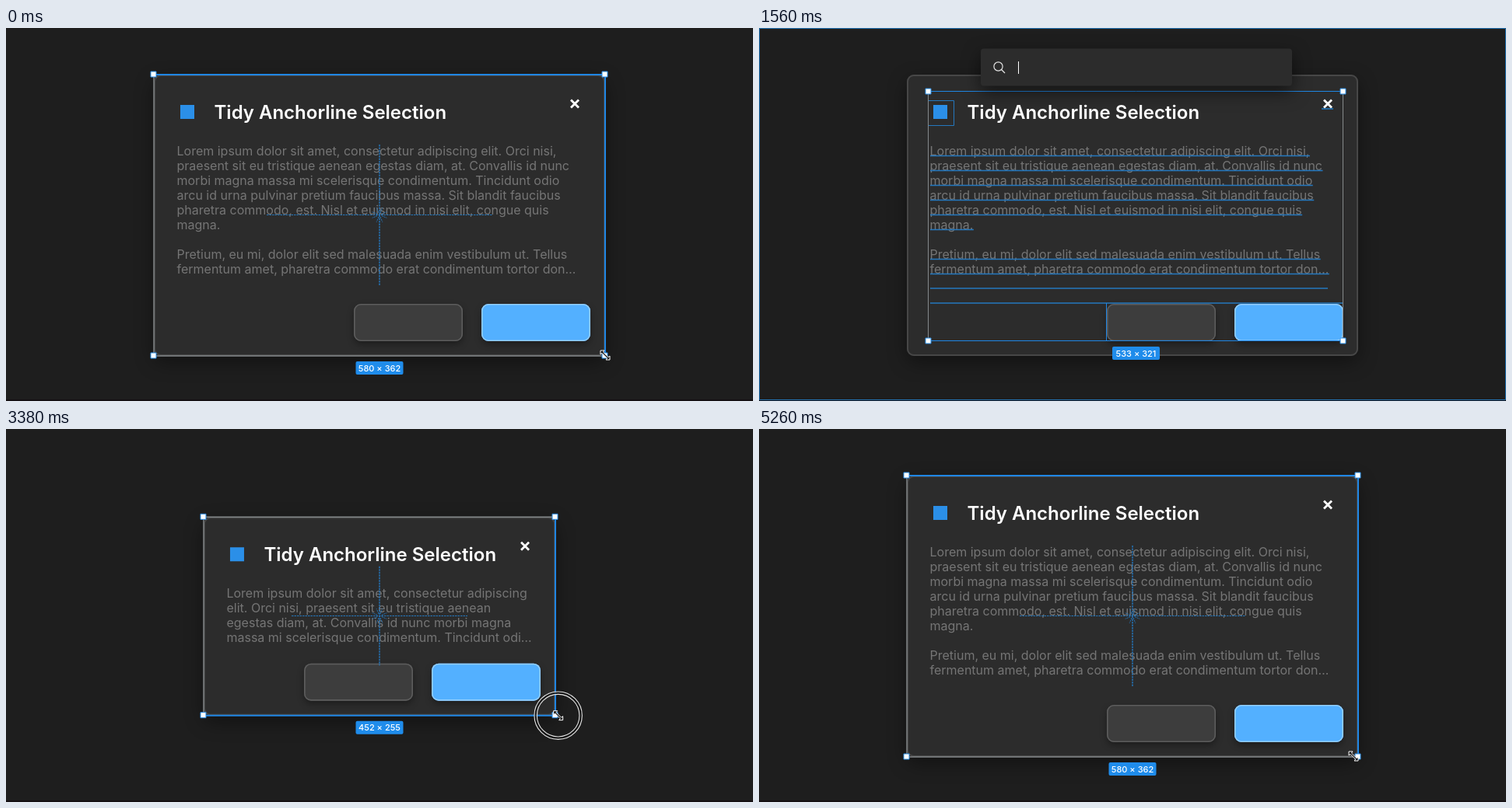
An HTML page with a canvas that plays this animation: 960 by 480 pixels, repeating every 5290 ms.

```html
<!DOCTYPE html>
<html lang="en">
<head>
<meta charset="utf-8">
<title>Resize demo</title>
<style>
html, body { margin: 0; width: 100%; height: 100%; overflow: hidden; background: #1e1e1e; }
canvas { display: block; }
</style>
</head>
<body>
<canvas id="stage" width="960" height="480"></canvas>
<script>
const ctx = document.getElementById('stage').getContext('2d');
const LOOP = 5290;
const CX = 480, CY = 241;
const FULL = { l: 190, t: 60, r: 770, b: 422 };
const BUTTONS = [447, 611], BUTTON_Y = 355, BUTTON_W = 140, BUTTON_H = 48;
const BLUE = '#1f86e4', UNDER = '#2478bf', RED = '#d0482c', EDGE = '#85898b';
const SANS = 'Inter, sans-serif';
const BODY = '400 16px ' + SANS;

const PLUGIN = 'Tidy Anchorlines';
const QUERY = 'tidy anchorlin';
const COMMANDS = ['Frame Selection', 'Ignore Selection', 'Selection',
  'Ungroup Selection', 'Watch Mode (beta)'];
const PARAGRAPHS = [
  'Lorem ipsum dolor sit amet, consectetur adipiscing elit. Orci nisi, praesent sit eu ' +
  'tristique aenean egestas diam, at. Convallis id nunc morbi magna massa mi scelerisque ' +
  'condimentum. Tincidunt odio arcu id urna pulvinar pretium faucibus massa. Sit blandit ' +
  'faucibus pharetra commodo, est. Nisl et euismod in nisi elit, congue quis magna.',
  '',
  'Pretium, eu mi, dolor elit sed malesuada enim vestibulum ut. Tellus fermentum amet, ' +
  'pharetra commodo erat condimentum tortor donec mattis.'
];

// Press and release times; the card follows the pointer a little late.
const DRAGS = [[90, 1040], [3010, 4480]];
const LAG = 60, START = 130;

// [time, x, y] turning points of the pointer
const POINTER = [
  [0, 770, 421], [90, 772, 422], [330, 722, 362], [590, 784, 381.5], [700, 794, 402],
  [940, 768, 427.5], [2880, 735, 446], [3000, 768, 421], [3060, 766, 420],
  [3130, 718, 410], [3330, 706, 368], [3630, 770, 386.5], [3690, 779, 408.5],
  [3770, 782, 417], [4050, 771, 428], [4540, 773, 424], [5260, 764, 421], [LOOP, 770, 421]
];

// monotone cubic through the turning points
function pointerAt(t) {
  const keys = POINTER, n = keys.length - 1;
  let i = 0;
  while (i < n - 1 && keys[i + 1][0] < t) i++;
  const span = keys[i + 1][0] - keys[i][0], u = (t - keys[i][0]) / span, v = 1 - u;
  const slope = (j, k) => (keys[j + 1][k] - keys[j][k]) / (keys[j + 1][0] - keys[j][0]);
  const tangent = (j, k) => {
    if (j === 0 || j === n) return 0;
    const a = slope(j - 1, k), b = slope(j, k);
    return a * b <= 0 ? 0 : 2 * a * b / (a + b);
  };
  return [1, 2].map(k =>
    keys[i][k] * v * v * (1 + 2 * u) + keys[i + 1][k] * u * u * (3 - 2 * u) +
    span * (tangent(i, k) * u * v * v - tangent(i + 1, k) * u * u * v));
}

const within = (t, a, b) => t >= a && t < b;
const snap = (v, stops, reach) => stops.find(s => Math.abs(v - s) < reach) ?? v;

// The card resizes about its centre and snaps to its old edges and the button middle.
function cardAt(t, dragging, pinned) {
  if (!dragging) return FULL;
  const [x, y] = pointerAt(t - LAG);
  const stops = pinned ? [FULL.b] : [FULL.b, BUTTON_Y + BUTTON_H / 2];
  const r = snap(x, [FULL.r], 10), b = snap(y + 0.5, stops, 7.5);
  return { l: 2 * CX - r, t: 2 * CY - b, r, b };
}

function line(x1, y1, x2, y2, color, width = 1, dash = []) {
  ctx.strokeStyle = color;
  ctx.lineWidth = width;
  ctx.setLineDash(dash);
  ctx.beginPath();
  ctx.moveTo(x1, y1);
  ctx.lineTo(x2, y2);
  ctx.stroke();
  ctx.setLineDash([]);
}

function box(x, y, w, h, radius, fill, stroke, width = 1) {
  ctx.beginPath();
  ctx.roundRect(x, y, w, h, radius);
  if (fill) { ctx.fillStyle = fill; ctx.fill(); }
  if (stroke) { ctx.strokeStyle = stroke; ctx.lineWidth = width; ctx.stroke(); }
}

function ring(x, y, r, color, width) {
  ctx.strokeStyle = color;
  ctx.lineWidth = width;
  ctx.beginPath();
  ctx.arc(x, y, r, 0, 2 * Math.PI);
  ctx.stroke();
}

function shadowed(blur, dy, alpha, draw) {
  ctx.save();
  ctx.shadowColor = `rgba(0,0,0,${alpha})`;
  ctx.shadowBlur = blur;
  ctx.shadowOffsetY = dy;
  draw();
  ctx.restore();
}

function text(str, x, y, font, color, align = 'left') {
  ctx.font = font;
  ctx.fillStyle = color;
  ctx.textAlign = align;
  ctx.fillText(str, x, y);
}

function wrap(width, maxLines) {
  ctx.font = BODY;
  const fits = s => ctx.measureText(s).width <= width;
  const rows = [];
  for (const p of PARAGRAPHS) {
    let row = '';
    for (const word of p.split(' ')) {
      const next = row ? row + ' ' + word : word;
      if (row && !fits(next)) { rows.push({ s: row, rest: ' ' + word }); row = word; }
      else row = next;
    }
    rows.push({ s: row, rest: '' });
  }
  const shown = rows.slice(0, Math.max(0, maxLines)).map(r => r.s);
  if (shown.length && shown.length < rows.length) {
    const last = rows[shown.length - 1];
    let s = last.s + last.rest;
    while (s && !fits(s + '…')) s = s.slice(0, -1);
    shown[shown.length - 1] = s.trimEnd() + '…';
  }
  return shown;
}

function closeMark(x, y) {
  line(x - 5, y - 5, x + 5, y + 5, '#fff', 2.8);
  line(x - 5, y + 5, x + 5, y - 5, '#fff', 2.8);
}

function button(x, y, fill, stroke) {
  shadowed(9, 4, 0.35, () => box(x, y, BUTTON_W, BUTTON_H, 9, fill));
  box(x + 0.8, y + 0.8, BUTTON_W - 1.6, BUTTON_H - 1.6, 8.2, null, stroke, 1.6);
}

function card(c, pinned) {
  const w = c.r - c.l, h = c.b - c.t;
  shadowed(24, 8, 0.4, () => box(c.l, c.t, w, h, 9, '#2c2c2c'));
  ctx.save();
  ctx.beginPath();
  ctx.roundRect(c.l, c.t, w, h, 9);
  ctx.clip();
  const left = c.l - FULL.l, top = c.t - FULL.t;
  const right = pinned ? c.r - FULL.r : left;
  const bottom = pinned ? c.b - FULL.b : top;

  box(224 + left, 99 + top, 18, 18, 0, '#2b8fe8');
  text('Tidy Anchorline Selection', 267.5 + left, 117 + top, '600 24px ' + SANS, '#fff');
  closeMark(731 + right, 97.5 + top);
  const rows = pinned
    ? wrap(521 + w - 580, Math.floor(9.8 + (h - 362) / 19))
    : wrap(521, 9);
  rows.forEach((s, i) => text(s, 219.5 + left, 164 + top + 19 * i, BODY, '#757575'));
  button(BUTTONS[0] + right, BUTTON_Y + bottom, '#3d3d3d', '#5d5d5d');
  button(BUTTONS[1] + right, BUTTON_Y + bottom, '#53b0ff', '#93ceff');
  ctx.restore();
  box(c.l + 1, c.t + 1, w - 2, h - 2, 8, null, '#474747', 2);
}

function handles(c) {
  for (const x of [c.l, c.r])
    for (const y of [c.t, c.b]) box(x - 4, y - 4, 7, 7, 0, '#fff', '#2b8fe8');
}

function sizeLabel(c) {
  const x = (c.l + c.r) / 2, y = c.b + 7;
  const s = Math.round(c.r - c.l) + ' × ' + Math.round(c.b - c.t);
  box(x - 30.5, y, 61, 17, 2, '#1f8ceb');
  text(s, x, y + 12.5, '500 11px ' + SANS, '#fff', 'center');
}

function redMark(x, y) {
  line(x - 3, y - 3, x + 2, y + 2, RED, 1.2);
  line(x - 3, y + 2, x + 2, y - 3, RED, 1.2);
}

function pins(c) {
  const x = CX, y = CY - 0.5, w = (c.r - c.l) / 4, h = (c.b - c.t) / 4;
  line(x - w, y, x + w, y, UNDER, 1.2, [2.5, 1]);
  line(x, y - h, x, y + h, UNDER, 1.4, [2.5, 1]);
  for (let i = 0; i < 8; i++) {
    const a = (i + 0.5) * Math.PI / 4, dx = Math.cos(a), dy = Math.sin(a);
    line(x + 3 * dx, y + 3 * dy, x + 10 * dx, y + 10 * dy, UNDER, 1, [2, 1]);
  }
}

function cardSelection(c, dragging) {
  const full = c.b === FULL.b;
  const snapX = dragging && c.r === FULL.r;
  const snapY = dragging && full;
  const snapMid = dragging && c.b === BUTTON_Y + BUTTON_H / 2;
  pins(c);
  line(c.l, c.t, c.l, c.b, EDGE, 1.4);
  line(c.l, c.t, c.r, c.t, full ? BLUE : EDGE, full ? 2 : 1.6);
  line(c.l, c.b, c.r, c.b, snapY ? RED : dragging ? BLUE : EDGE, dragging ? 2 : 1.4);
  if (!snapX) line(c.r, c.t, c.r, c.b, BLUE, 2);
  if (snapMid) line(BUTTONS[0], c.b, c.r, c.b, RED, 2);
  handles(c);
  if (snapX) {
    line(c.r, c.t, c.r, c.b, EDGE, 2);
    line(c.r - 0.5, FULL.t, c.r - 0.5, FULL.b, RED, 1.2);
    redMark(c.r, FULL.t);
    redMark(c.r, FULL.b);
  }
  if (snapY) redMark(c.l, c.b);
  if (snapMid) BUTTONS.forEach(x => { redMark(x, c.b); redMark(x + BUTTON_W, c.b); });
  sizeLabel(c);
}

function childSelection() {
  const c = { l: 218, t: 82, r: 751, b: 403 };
  const under = (x1, x2, y) => line(x1, y, x2, y, UNDER, 1.6);
  box(0.5, 0.5, 959, 478, 0, null, '#2273b4');
  ctx.font = BODY;
  wrap(521, 9).forEach((s, i) => {
    if (s) under(220, 220 + ctx.measureText(s).width, 164.5 + 19 * i);
  });
  under(220, 731, 335);
  under(220, 751, 354);
  under(723, 738, 104);
  line(446.5, 354, 446.5, 402, BLUE);
  box(217.5, 93.5, 33, 32, 0, null, UNDER);
  line(c.l, c.t - 0.5, c.r, c.t - 0.5, BLUE);
  line(c.l - 0.5, c.t, c.l - 0.5, c.b, EDGE);
  line(c.r - 0.5, c.t, c.r - 0.5, c.b, EDGE);
  line(c.l, c.b - 0.5, c.r, c.b - 0.5, BLUE);
  handles(c);
  sizeLabel(c);
}

function palette(t) {
  const font = '400 13px ' + SANS;
  const typed = QUERY.slice(0, Math.max(0, Math.floor((t - 1610) / 42)));
  const active = (t > 2380) + (t > 2500);
  shadowed(22, 8, 0.55, () => box(285, 26.5, 400, typed ? 216 : 48, 4, '#2c2c2c'));
  ring(307.5, 49.5, 5.6, '#e4e4e4', 1.2);
  line(311.5, 53.5, 316, 58, '#e4e4e4', 1.2);
  text(typed, 332.5, 55.5, font, '#fff');
  const end = 333.5 + ctx.measureText(typed).width;
  line(end, 43, end, 59, '#fff');
  if (!typed) return;
  COMMANDS.forEach((name, i) => {
    const y = 91 + 32 * i;
    if (i === active) box(285, y - 16, 400, 32, 0, '#383838');
    box(303.5, y - 5.5, 10, 10, 0, '#2b8fe8');
    text(PLUGIN, 332.5, y + 4.5, font, '#fff');
    text('›', 437.5, y + 4.5, font, '#d0d0d0');
    text(name, 447, y + 4.5, font, '#fff');
  });
}

function pointer(x, y, pressed) {
  if (pressed) {
    ring(x, y, 29, 'rgba(18,18,18,.75)', 4);
    ring(x, y, 30.7, '#e6e6e6', 1.1);
    ring(x, y, 27.3, '#e6e6e6', 1.1);
  }
  const half = [[-6, -6], [-1, -6], [-2.6, -4], [4, 2.6], [6, 1]];
  ctx.beginPath();
  for (const s of [1, -1]) half.forEach(p => ctx.lineTo(x + p[0] * s, y + p[1] * s));
  ctx.closePath();
  ctx.fillStyle = '#111';
  ctx.fill();
  ctx.strokeStyle = '#fff';
  ctx.lineWidth = 1;
  ctx.stroke();
}

function draw(t) {
  ctx.fillStyle = '#1e1e1e';
  ctx.fillRect(0, 0, 960, 480);
  ctx.fillStyle = '#151013';
  ctx.fillRect(0, 478, 960, 2);

  const pinned = t > 2720;
  const pressed = DRAGS.some(([a, b]) => within(t, a, b));
  const dragging = DRAGS.some(([a, b]) => within(t, a + START, b));
  const c = cardAt(t, dragging, pinned);

  card(c, pinned);
  if (within(t, 1150, 2800)) childSelection();
  else cardSelection(c, dragging);
  if (within(t, 1400, 2720)) palette(t);
  if (!within(t, 1150, 2880)) pointer(...pointerAt(t), pressed);
}

const start = performance.now();
function tick() {
  draw((performance.now() - start) % LOOP);
  requestAnimationFrame(tick);
}
tick();
</script>
</body>
</html>
```
